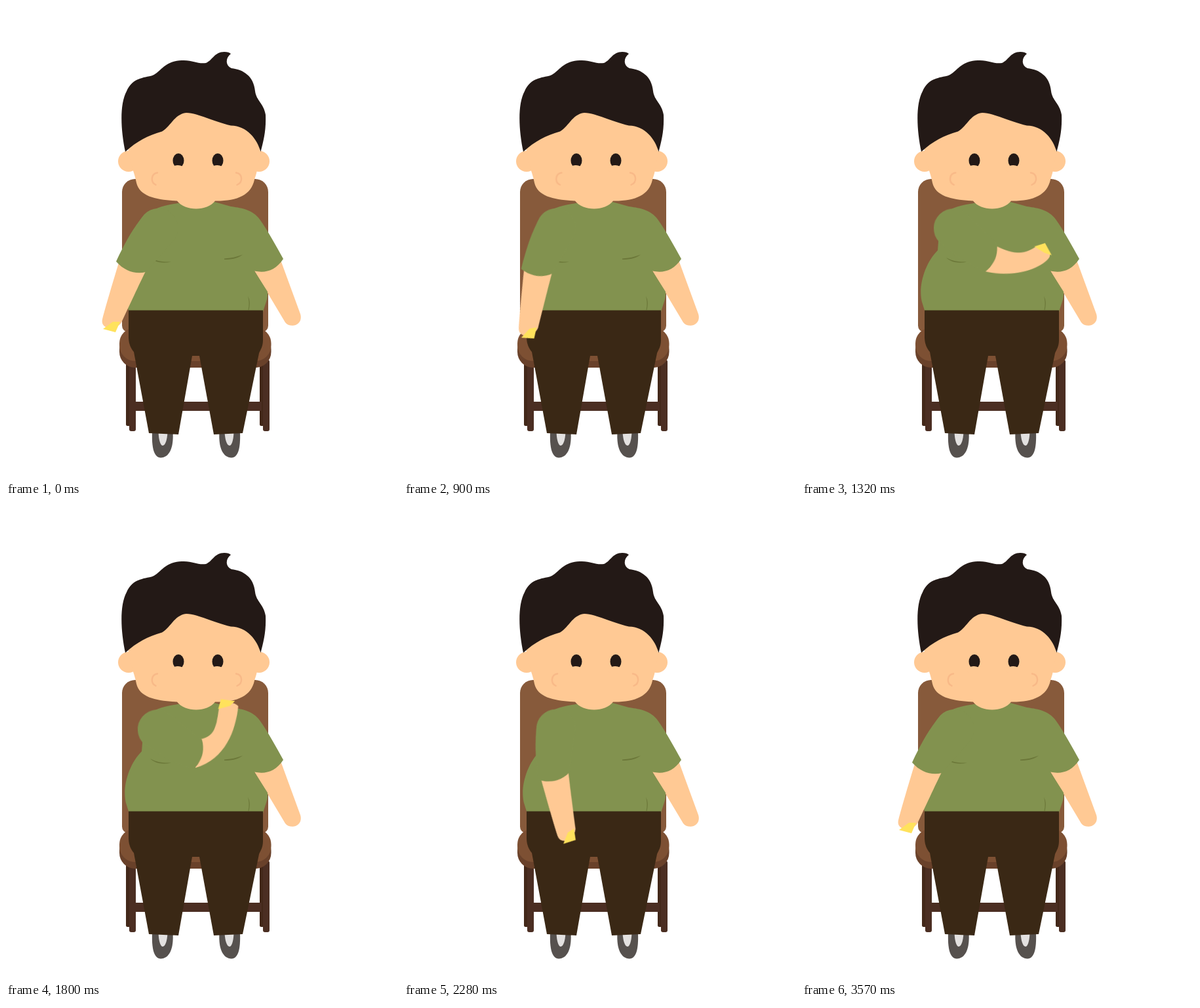
Recreate the animation shown at these times as an HTML page without scripts. Size 598 by 722 pixels, loop 3.6 s.

```html
<!DOCTYPE html>
<html lang="en">
<head>
<meta charset="utf-8">
<title>Snack time</title>
<style>
  html, body { margin: 0; width: 100%; height: 100%; overflow: hidden; background: #fff; }
  svg { display: block; width: 598px; height: 722px; }

  .skin { fill: #ffc994; }
  .hair { fill: #231916; }
  .shirt { fill: #82924f; }
  .fold { fill: #6b7739; }
  .trousers { fill: #3a2815; }
  .wood { fill: #875a3b; }
  .leg { fill: #4b2e22; }
  .leg-back { fill: #432819; }
  .food { fill: #ffe25c; }
  .cheek { fill: none; stroke: #f8b988; stroke-width: 2.4; stroke-linecap: round; }

  /* Chewing: one squeeze and release every 600 ms */
  .cheek { animation: chew 600ms linear infinite; }
  .cheek.left { --squeeze: 9.5px; }
  .cheek.right { --squeeze: -6px; }
  @keyframes chew {
    0%, 10%, 90%, 100% { transform: translateX(0); }
    40%, 60% { transform: translateX(var(--squeeze)); }
  }

  .arm, .forearm, .food { animation: 3600ms linear infinite; }
  .arm { animation-name: swing; transform-origin: 232px 340px; }
  .forearm { animation-name: bend; }
  .food { animation-name: carry; }

  @keyframes swing {
    0%, 23.333%, 68.333%, 100% { transform: rotate(0deg); }
    36.667%, 55% { transform: rotate(-87deg); }
    41.667%, 50% { transform: rotate(-93deg); }
  }
  /* Shapes are in the arm's own frame: straight, half bent, raised, at the mouth */
  @keyframes bend {
    0%, 29.167%, 62.5%, 100% {
      d: path("M213 405C204 423 187 460 177 481C172 495 143 496 147 478C153 455 165 415 172 392Z");
    }
    36.667%, 55% {
      d: path("M212 398C198 430 196 445 210 465C214 486 201 494 191 484C172 465 162 425 170 388Z");
    }
    41.667%, 50% {
      d: path("M213 392C214 425 228 428 259 434C268 440 272 455 262 464C225 458 182 440 171 394Z");
    }
    43.333%, 48.333% {
      d: path("M213 390C217 403 239 406 264 406C279 408 279 433 265 435C227 436 182 426 171 394Z");
    }
  }
  @keyframes carry {
    0%, 29.167%, 62.5%, 100% { d: path("M148 493L167 498L174 482L163 482Z"); }
    36.667%, 55% { d: path("M199 491L217 480L211 464L202 480Z"); }
    41.667%, 50% { d: path("M270 459L274 438L259 433L263 451Z"); }
    43.333%, 48.333% { d: path("M283 428L278 408L262 408L273 423Z"); }
  }
</style>
</head>
<body>
<svg viewBox="0 0 598 722">
  <defs>
    <g id="shoe">
      <path fill="#56514e" d="M223 650C222 675 226 689.500 236 689.500C249 689 256 675 254.500 650Z"/>
      <path fill="#e3e1e0" d="M232.500 650C233 664 236 671 239 671C243 671 246 662 246.500 650Z"/>
    </g>
    <g id="eye">
      <ellipse class="hair" cx="263" cy="236" rx="8.500" ry="11"/>
      <ellipse class="skin" cx="262" cy="249" rx="10" ry="6"/>
    </g>
  </defs>

  <g id="chair">
    <rect class="leg-back" x="183" y="540" width="7" height="101" rx="2.500"/>
    <rect class="leg-back" x="387" y="540" width="7" height="101" rx="2.500"/>
    <rect class="leg" x="195" y="604" width="195" height="14"/>
    <rect class="leg" x="188" y="540" width="10" height="109" rx="3"/>
    <rect class="leg" x="392" y="540" width="10" height="109" rx="3"/>
    <rect class="wood" x="177" y="264" width="223" height="235" rx="20"/>
    <rect class="wood" x="177" y="400" width="223" height="98" rx="10"/>
    <rect fill="#69412a" x="173" y="500" width="231.500" height="52" rx="24"/>
    <rect fill="#7d5033" x="173" y="491" width="231.500" height="51" rx="24"/>
  </g>

  <use href="#shoe"/>
  <use href="#shoe" transform="matrix(-1 0 0 1 580 0)"/>

  <path class="skin" d="M419 388L449 470C454 487 434 493 426 483L377 401Z"/>
  <path class="shirt" d="M262 301C242 304 222 309 211 322L207 373C186 394 176 432 184 455L188 468H392
    C394 457 400 448 399 436L379 404.500C396 408 411 404 423 386C412 366 398 341 388 327
    C376 309 355 308 343 306L318 299Z"/>
  <path class="fold" d="M220 384C230 390 240 391 252 390.500C240 393 228 392 220 384Z"/>
  <path class="fold" d="M333 385.500C343 385 352 383 361 379.500C352 386 343 387 333 387Z"/>
  <path class="fold" d="M369 443C373 450 372 457 370.500 464H369.500C371 457 371 450 369 443Z"/>
  <path class="trousers" d="M187 464.500H392V510C392 520 388 525 386 530L361 652L317 654L295 534H284
    L263 654L218 652L195 528C190 522 187 515 187 505Z"/>

  <g id="head">
    <circle class="skin" cx="187" cy="237" r="16"/>
    <circle class="skin" cx="386" cy="237" r="16"/>
    <path class="skin" d="M185 200C186 235 196 253 199 270C204 291 230 296 261 297.500
      C273 313.500 307 313.500 319 297.500C352 298 374 289 379 265C384 250 388 235 388 200L340 160H240Z"/>
    <path class="hair" d="M182 222.500C175 190 173 150 184 130C192 112 205 110 222 106.500
      C236 102 240 84 268 83C285 82 292 89 305 87C315 83 318 70 333 70C338 70 341 71 343 73
      C335 79 334 90 344 95C362 97 378 107 380 130C382 145 393 148 396 166C397 190 393 205 388.500 222.500
      C383 203 368 183 343 182.500C315 176 295 164 275 163C257 165 252 183 238 191.500C216 198 200 206 182 222.500Z"/>
    <use href="#eye"/>
    <use href="#eye" x="60"/>
    <path class="cheek left" d="M231 254.500C221 256 220 269 228.500 273"/>
    <path class="cheek right" d="M351 254.500C361 256 362 269 352.500 273"/>
  </g>

  <g class="arm">
    <path class="forearm skin" d="M213 405C204 423 187 460 177 481C172 495 143 496 147 478C153 455 165 415 172 392Z"/>
    <path class="food" d="M148 493L167 498L174 482L163 482Z"/>
    <path class="shirt" d="M168 390C181 405 198 410 213.500 406L258 355A30 30 0 0 0 207 323C192 343 182 360 168 390Z"/>
  </g>
</svg>
</body>
</html>
```
